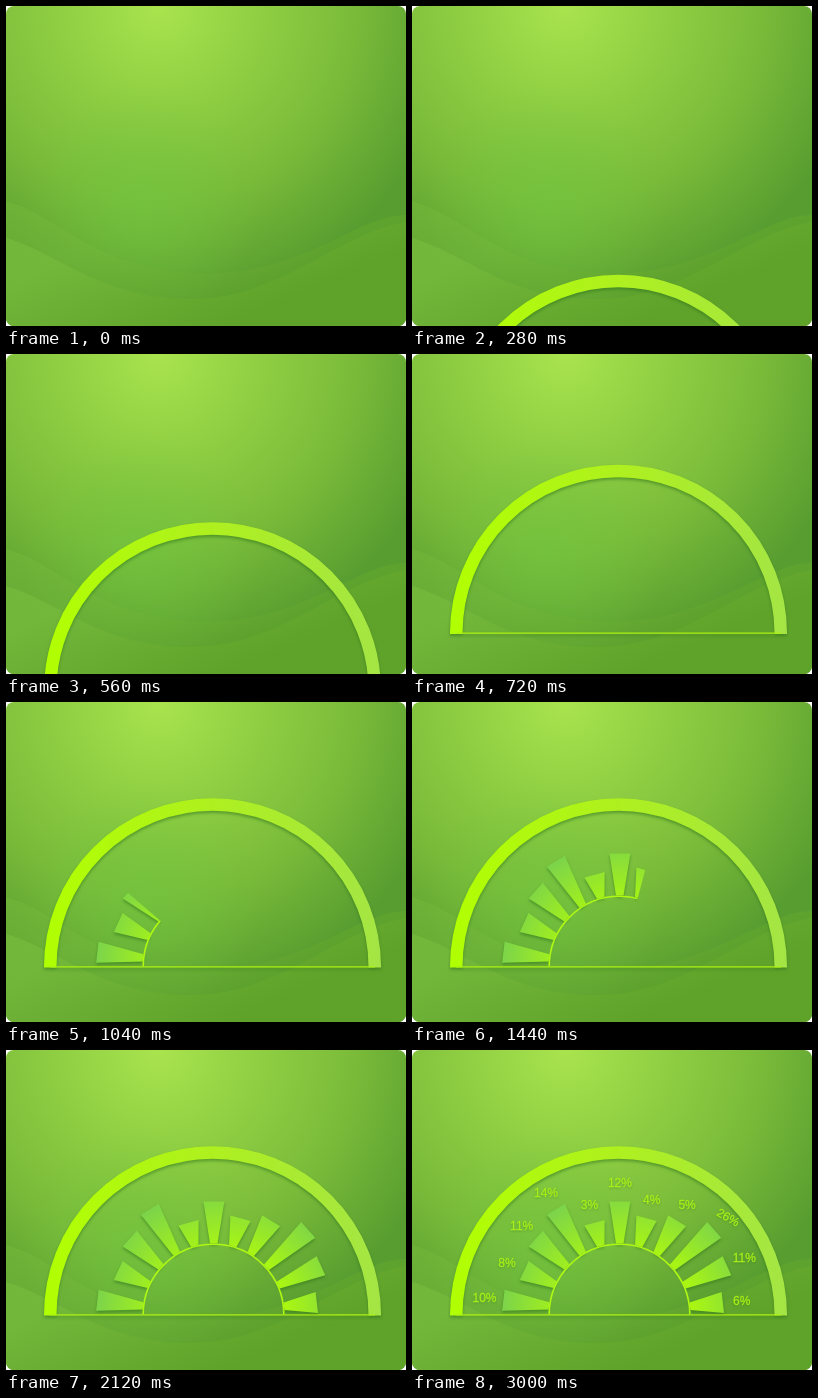
Animation, 400 px wide and 320 px high, one loop 3120 ms. Source, as an HTML page:

```html
<!DOCTYPE html>
<html lang="en">
<head>
<meta charset="utf-8">
<title>Radial chart</title>
<style>
  html, body { margin: 0; width: 100%; height: 100%; overflow: hidden; background: #fff; }
  svg { display: block; width: 400px; height: 320px; }
  .raised { filter: drop-shadow(0 2px 1.5px rgba(45, 115, 25, .55)); }
  #labels {
    font: 12px "Liberation Sans", Arial, sans-serif; text-anchor: middle;
    fill: #a8ee18; stroke: #a8ee18; stroke-width: .3px;
    filter: drop-shadow(0 1px 1px rgba(45, 115, 25, .35));
  }
</style>
</head>
<body>
<svg viewBox="0 0 400 320">
  <defs>
    <radialGradient id="sky" gradientUnits="userSpaceOnUse" cx="153" cy="0" r="330">
      <stop offset="0" stop-color="#a9e44e"/>
      <stop offset=".3" stop-color="#90cf43"/>
      <stop offset=".6" stop-color="#79ba39"/>
      <stop offset=".9" stop-color="#589d30"/>
    </radialGradient>
    <radialGradient id="glow" gradientUnits="userSpaceOnUse" cx="135" cy="200" r="120">
      <stop offset="0" stop-color="#70c640" stop-opacity=".6"/>
      <stop offset="1" stop-color="#70c640" stop-opacity="0"/>
    </radialGradient>
    <linearGradient id="wave" gradientUnits="userSpaceOnUse" x1="160" y1="210" x2="210" y2="325">
      <stop offset="0" stop-color="#74b83b"/>
      <stop offset="1" stop-color="#60a329"/>
    </linearGradient>
    <linearGradient id="rim" gradientUnits="userSpaceOnUse" x1="38" y1="0" x2="375" y2="0">
      <stop offset="0" stop-color="#b1ff02"/>
      <stop offset=".5" stop-color="#aef01f"/>
      <stop offset="1" stop-color="#a4e545"/>
    </linearGradient>
    <radialGradient id="ray" gradientUnits="userSpaceOnUse" cx="217" cy="264" r="130">
      <stop offset=".48" stop-color="#abf711"/>
      <stop offset="1" stop-color="#7ad24d"/>
    </radialGradient>
    <clipPath id="card"><rect width="400" height="320" rx="8"/></clipPath>
    <clipPath id="sweep"><path id="wedge"/></clipPath>
  </defs>
  <g clip-path="url(#card)">
    <rect width="400" height="320" fill="url(#sky)"/>
    <rect width="400" height="320" fill="url(#glow)"/>
    <path fill="url(#wave)" opacity=".5" d="M0 195C60 213 85 262 190 267S350 209 400 209V320H0Z"/>
    <path fill="url(#wave)" opacity=".85" d="M0 232C55 248 95 293 185 293S330 228 400 216V320H0Z"/>
    <g id="dome" class="raised" fill="none" stroke="url(#rim)">
      <path stroke-width="12.5" d="M44.25 265.5V264.75A162.25 162.25 0 0 1 368.75 264.75V265.5"/>
      <path stroke="#aef212" stroke-width="1.3" d="M44 264.8H369"/>
    </g>
    <g clip-path="url(#sweep)">
      <g id="bars" class="raised" fill="url(#ray)"></g>
      <path fill="none" stroke="#aef814" stroke-width="1.6" d="M137.2 264.5A70.3 70.3 0 0 1 277.8 264.5"/>
    </g>
    <g id="labels"></g>
  </g>
</svg>
<script>
const LOOP = 3120, STEP = 40;
const CENTER = { x: 207.5, y: 264.5 };
const INNER = 71, INNER_WIDTH = 7.5, OUTER_WIDTH = 21, LABEL_GAP = 19;
const shares = [10, 8, 11, 14, 3, 12, 4, 5, 26, 11, 6];
const reaches = [117, 105, 113, 123, 95, 113, 100, 110, 127, 118, 104];

const byId = id => document.getElementById(id);
const clamp = (v, lo, hi) => Math.min(hi, Math.max(lo, v));

// Degrees run clockwise from the left end of the baseline.
function polar(degrees, radius, side = 0) {
  const a = Math.PI * (1 + degrees / 180);
  return [
    CENTER.x + radius * Math.cos(a) - side * Math.sin(a),
    CENTER.y + radius * Math.sin(a) + side * Math.cos(a)
  ];
}

function add(parent, tag, attrs) {
  const el = document.createElementNS("http://www.w3.org/2000/svg", tag);
  for (const key in attrs) el.setAttribute(key, attrs[key]);
  return parent.appendChild(el);
}

shares.forEach((share, i) => {
  const turn = i / (shares.length - 1);
  const angle = 7 + 166.4 * turn + 2 * Math.sin(2 * Math.PI * turn);
  const reach = reaches[i];
  const corners = [
    polar(angle, reach, -OUTER_WIDTH / 2), polar(angle, reach, OUTER_WIDTH / 2),
    polar(angle, INNER, INNER_WIDTH / 2), polar(angle, INNER, -INNER_WIDTH / 2)
  ];
  add(byId("bars"), "polygon", { points: corners.join(" ") });

  const [x, y] = polar(angle, reach + LABEL_GAP);
  const tilt = share > 20 ? 30 : 0;
  const label = add(byId("labels"), "text", { y: 4.3, transform: `translate(${x} ${y}) rotate(${tilt})` });
  label.textContent = share + "%";
});

function wedgePath(degrees) {
  const r = 150;
  return `M${CENTER.x} ${CENTER.y}L${polar(0, r)}A${r} ${r} 0 0 1 ${polar(degrees, r)}Z`;
}

function draw(time) {
  const t = Math.floor((time % LOOP) / STEP) * STEP;
  const drop = 230 * clamp((760 - t) / 640, 0, 1);
  byId("dome").setAttribute("transform", `translate(0 ${drop})`);
  byId("dome").style.visibility = t < 160 ? "hidden" : "visible";

  const u = clamp((t - 760) / 1100, 0, 1);
  byId("wedge").setAttribute("d", wedgePath(180 * (0.85 * u + 0.15 * u * u)));

  byId("labels").setAttribute("opacity", clamp((t - 2200) / 800, 0, 1));
}

const start = performance.now();
function tick() {
  draw(performance.now() - start);
  requestAnimationFrame(tick);
}
tick();
</script>
</body>
</html>
```
